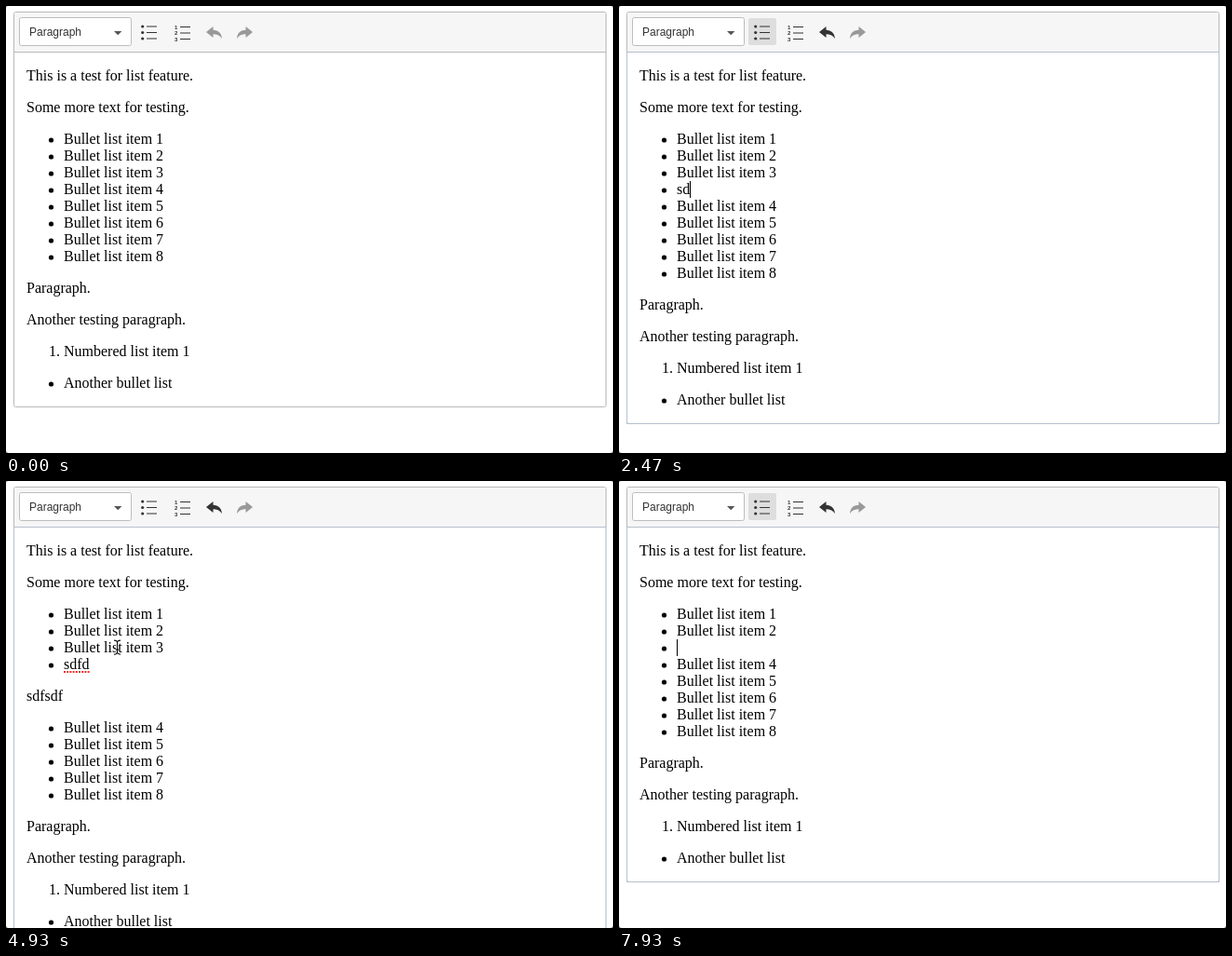
An HTML page for the animation above (8000 ms loop, 652 px wide and 480 px high).

```html
<!DOCTYPE html>
<html lang="en">
<head>
<meta charset="utf-8">
<title>List editing</title>
<style>
html, body { margin: 0; width: 100%; height: 100%; overflow: hidden; background: #fff; }
svg { display: block; width: 652px; height: 480px; }
text { white-space: pre; }
#doc { font: 16px "Liberation Serif", "Times New Roman", Times, serif; }
#label { font: 12px "Liberation Sans", Arial, sans-serif; fill: #333; }
#digits { font: bold 6px "Liberation Sans", Arial, sans-serif; fill: #333; }
</style>
</head>
<body>
<svg viewBox="0 0 652 480">
  <rect width="652" height="480" fill="#fff"/>
  <rect id="frame" x="8.5" y="6.5" width="636" fill="#fff" stroke="#b9b9b9" rx="2"/>
  <path d="M9 49V9Q9 7 11 7H642Q644 7 644 9V49Z" fill="#f6f6f6"/>
  <path id="edge" fill="none"/>
  <g id="ring" fill="none">
    <rect id="glow" x="8" y="49" width="637" rx="2" stroke="#a5cbf4" stroke-width="5" opacity=".6"/>
    <rect id="core" x="8" y="49" width="637" rx="2" stroke="#80b6ee" stroke-width="2.6"/>
  </g>
  <rect x="14.500" y="12.500" width="120" height="30" rx="2" fill="#fff" stroke="#bdbdbd"/>
  <text id="label" x="25" y="32">Paragraph</text>
  <path d="M116 27H124.400L120.200 31.300Z" fill="#555"/>
  <rect id="active" x="139" y="13" width="30" height="29" rx="2" fill="#dedede"/>
  <path d="M151 22H162M151 28.500H162M151 35H162M187 22.500H198M187 29H198M187 35.500H198" stroke="#333" stroke-width="1.200"/>
  <g fill="#333">
    <circle cx="146.700" cy="22" r="1.600"/>
    <circle cx="146.700" cy="28.500" r="1.600"/>
    <circle cx="146.700" cy="35" r="1.600"/>
  </g>
  <g id="digits"><text x="181" y="24.500">1</text><text x="181" y="31">2</text><text x="181" y="37.500">3</text></g>
  <path id="undo" d="M215 28L222.500 22V25.700C228 26 231.500 29 232 35C229.500 31.500 226.500 30.300 222.500 30.300V34Z"/>
  <path transform="matrix(-1 0 0 1 480 0)" fill="#999" d="M215 28L222.500 22V25.700C228 26 231.500 29 232 35C229.500 31.500 226.500 30.300 222.500 30.300V34Z"/>
  <g id="doc"></g>
  <rect id="caret" width="1" height="18"/>
  <g id="mouse">
    <circle id="press" r="15" fill="none" stroke="#000" stroke-width="3"/>
    <g id="beam" fill="none">
      <path d="M-3.500 -7.500Q0 -7.500 0 -5Q0 -7.500 3.500 -7.500M0 -5V5M-3.500 7.500Q0 7.500 0 5Q0 7.500 3.500 7.500M-1.500 2.500H1.500" stroke="#fff" stroke-width="2.600"/>
      <path d="M-3.500 -7.500Q0 -7.500 0 -5Q0 -7.500 3.500 -7.500M0 -5V5M-3.500 7.500Q0 7.500 0 5Q0 7.500 3.500 7.500M-1.500 2.500H1.500" stroke="#111" stroke-width="1.100"/>
    </g>
    <path id="arrow" d="M0 0V15L3.500 11.800L6 17.200L8.300 16.200L6 11H10.500Z" fill="#000" stroke="#fff"/>
  </g>
  <path d="M0 477Q0 480 3 480H0ZM652 477Q652 480 649 480H652ZM0 2Q0 0 2 0H0ZM652 2Q652 0 650 0H652Z" fill="#666"/>
</svg>
<script>
const LOOP = 8000;
const CLICK = 1270, SPLIT = 2130, NEXT = 2800, LEAVE = 3270;
const DRAG = 5270, DROP = 6130, CUT = 6470;
const WORD1 = [2400, 2470, 2560, 2670];
const WORD2 = [3600, 3730, 3800, 3930, 4070, 4200];
const ERASE = Array.from({ length: 7 }, (_, i) => 7000 + i * 110);
const KEYS = [CLICK, SPLIT, ...WORD1, NEXT, LEAVE, ...WORD2, DRAG, CUT, ...ERASE];

const $ = id => document.getElementById(id);
const set = (id, attrs) => { for (const k in attrs) $(id).setAttribute(k, attrs[k]); };
const show = (id, on) => set(id, { visibility: on ? 'inherit' : 'hidden' });
const count = (times, t) => times.filter(k => k <= t).length;
const clamp = v => Math.max(0, Math.min(1, v));
const pen = document.createElement('canvas').getContext('2d');
pen.font = '16px "Liberation Serif", "Times New Roman", Times, serif';
const width = s => pen.measureText(s).width;

function blocks(t) {
  const p = (text, extra) => ({ type: 'p', text, ...extra });
  const li = (text, extra) => ({ type: 'ul', text, ...extra });
  const item = n => li('Bullet list item ' + n);
  const list = [p('This is a test for list feature.'), p('Some more text for testing.'), item(1), item(2)];
  if (t >= CUT) {
    list.push(li('Bullet '.slice(0, 7 - count(ERASE, t)), { caret: true }));
  } else {
    list.push({ ...item(3), pick: 1, caret: t < SPLIT });
    if (t >= SPLIT) list.push(li('sdfd'.slice(0, count(WORD1, t)), { pick: 2, caret: t < NEXT, bad: t >= NEXT }));
    if (t >= NEXT) {
      const make = t < LEAVE ? li : p;
      list.push(make('sdfsdf'.slice(0, count(WORD2, t)), { pick: 3, caret: t < DRAG, bad: t >= DRAG }));
    }
  }
  for (let n = 4; n <= 8; n++) list.push(item(n));
  list.push(p('Paragraph.'), p('Another testing paragraph.'), { type: 'ol', text: 'Numbered list item 1' }, li('Another bullet list'));
  return list;
}

// Selected span of a line; depth is how many lines the drag has reached.
function span(b, x, depth) {
  if (!b.pick || b.pick > depth) return '';
  const from = b.pick === 1 ? x + width('Bullet ') : x;
  const to = x + width(b.text) + (b.pick < depth ? 4 : 0);
  return [from, to];
}

function layout(t, depth) {
  let y = 66, last = null, html = '', caret = null;
  for (const b of blocks(t)) {
    if (last) y += 18 + (b.type === 'p' || b.type !== last ? 16 : 0);
    last = b.type;
    const x = b.type === 'p' ? 22 : 62;
    const sel = span(b, x, depth);
    if (sel) html += `<rect x="${sel[0]}" y="${y}" width="${sel[1] - sel[0]}" height="18" fill="#b3d4fd"/>`;
    if (b.type === 'ul') html += `<circle cx="48.5" cy="${y + 10}" r="2.6"/>`;
    if (b.type === 'ol') html += `<text x="46" y="${y + 14}">1.</text>`;
    html += `<text x="${x}" y="${y + 14}">${b.text}</text>`;
    if (b.bad) html += `<path d="M${x} ${y + 17}h${width(b.text)}" stroke="#e2352f" stroke-width="2" stroke-dasharray="2 1.2"/>`;
    if (b.caret) caret = [Math.round(x + width(b.text)), y];
  }
  return { html, caret, bottom: y + 34 };
}

function pointer(t) {
  const mix = (a, b, k) => [a[0] + (b[0] - a[0]) * k, a[1] + (b[1] - a[1]) * k];
  const ease = k => k * k * (3 - 2 * k);
  const rest = [175.5, 177], start = [105, 179], end = [101, 236];
  if (t < 1950) return mix([312, 486], rest, ease(clamp((t - 70) / 860)));
  if (t < DRAG) return mix(rest, start, ease(clamp((t - 4400) / 750)));
  return mix(start, end, ease(clamp((t - DRAG) / 290)));
}

let drawn = '';
function render(t) {
  const [mx, my] = pointer(t);
  const dragging = t >= DRAG && t < CUT;
  const depth = !dragging || my < 188 ? 0 : my < 212 ? 2 : 3;
  const page = layout(t, depth);
  if (page.html !== drawn) $('doc').innerHTML = drawn = page.html;

  const focused = t >= CLICK, edited = t >= SPLIT;
  set('frame', { height: page.bottom - 6 });
  set('edge', {
    d: edited ? `M8.500 49.500H644.500V${page.bottom + .5}H8.500Z` : 'M8 49.500H645',
    stroke: edited ? '#b5c0cd' : '#b9b9b9'
  });
  const h = page.bottom + 1 - 49;
  set('glow', { height: h });
  set('core', { height: h });
  show('ring', focused && !edited);
  show('active', focused && (t < LEAVE || t >= DRAG));
  set('undo', { fill: edited ? '#333' : '#999' });

  const key = Math.max(0, ...KEYS.filter(k => k <= t));
  const on = (t - key) % 1000 < 500;
  show('caret', focused && page.caret && on);
  if (page.caret) set('caret', { x: page.caret[0], y: page.caret[1] });

  set('mouse', { transform: `translate(${mx} ${my})` });
  show('mouse', t >= 70 && t < 1950 || t >= 4400 && t < CUT);
  show('press', t >= CLICK && t < CLICK + 150 || t >= DRAG && t < DROP);
  show('beam', my < page.bottom);
  show('arrow', my >= page.bottom);
}

const begin = performance.now();
function tick() {
  render((performance.now() - begin) % LOOP);
  requestAnimationFrame(tick);
}
tick();
</script>
</body>
</html>
```
